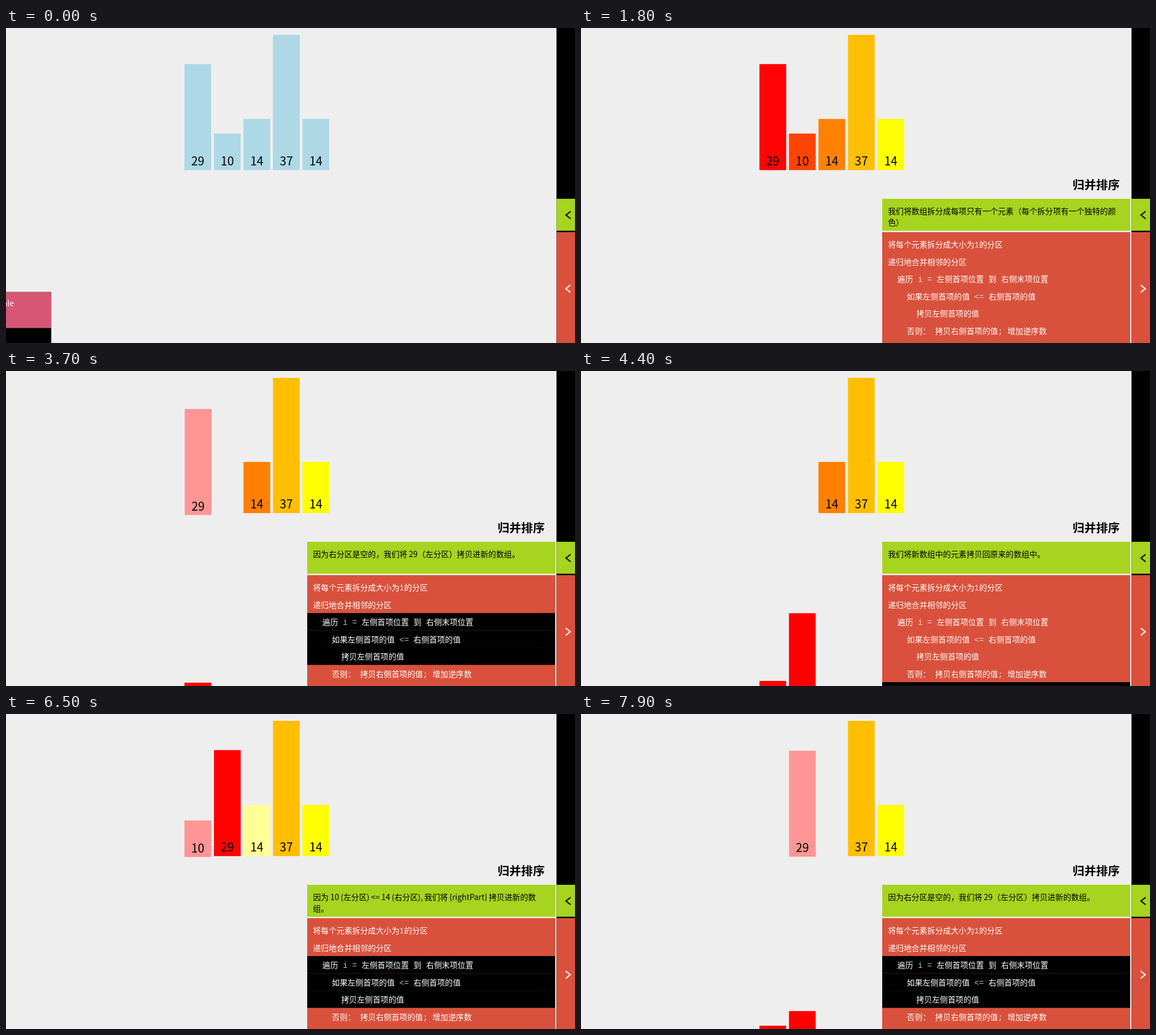
An HTML page that plays this animation: 1005 by 557 pixels, repeating every 8000 ms.

```html
<!DOCTYPE html>
<html lang="zh-CN">
<head>
<meta charset="utf-8">
<title>归并排序</title>
<style>
  html, body { margin: 0; width: 100%; height: 100%; overflow: hidden; background: #eee; }
  svg { display: block; overflow: hidden; }
  text { font: 13.89px "Noto Sans CJK SC", "Noto Sans CJK", sans-serif; white-space: pre; }
  #bars text { font-size: 20.84px; text-anchor: middle; }
  #title { font-size: 20.84px; font-weight: bold; text-anchor: end; }
  #status text { word-spacing: -.3px; }
  #code text { font-family: "Liberation Mono", "Noto Sans CJK SC", "Noto Sans CJK", monospace; fill: #fff; }
  #code tspan { fill-opacity: .75; }
  polyline { fill: none; stroke-width: 2.4; }
</style>
</head>
<body>
<svg id="stage" width="1005" height="557" viewBox="0 0 1005 557">
  <rect width="1005" height="557" fill="#eee"/>
  <g id="bars"></g>
  <svg id="menu" x="0" y="466.5" width="80" height="91">
    <rect width="80" height="91"/>
    <rect width="80" height="64" fill="#d65775"/>
    <text x="14" y="25" text-anchor="end" fill="#fff">ale</text>
  </svg>
  <text id="title" x="951.5" y="284.8">归并排序</text>
  <svg id="status" y="302" height="56.5">
    <rect width="438" height="57" fill="#a7d41e"/>
    <text x="10.2" y="26.6"></text>
    <text x="10.2"></text>
  </svg>
  <svg id="code" y="361" height="196">
    <rect width="438" height="196" fill="#d9513c"/>
  </svg>
  <rect x="972.3" width="33" height="557"/>
  <rect x="972.3" y="302" width="33" height="56.5" fill="#a7d41e"/>
  <rect x="972.3" y="361" width="33" height="196" fill="#d9513c"/>
  <polyline points="997.2,324.2 989,330.7 997.2,337.2" stroke="#1c2208"/>
  <polyline id="arrow" points="996.8,454.5 988.8,461 996.8,467.5" stroke="#f8dfdb"/>
</svg>
<script>
const LOOP = 8000, TICK = 100, MOVE = 280, SLIDE = 500, SLIDE_START = 165;
const BASE = 251.3, UNIT = 6.465, GAP = 52.12, LEFT = 315.2, DROP = 364.5;
const RED = '#ff0000', PINK = '#ff9696', BLUE = '#add8e6';

const leftEmpty = n => `因为右分区是空的，我们将 ${n}（左分区）拷贝进新的数组。`;
const takeRight = (a, b) => `因为 ${a} (左分区) > ${b} (右分区), 我们将 ${b} 拷贝进新的数组。`;
const addCount = n => `(我们将左分区的大小 (= 1) 加至逆序数 (${n}).)`;
const copyBack = '我们将新数组中的元素拷贝回原来的数组中。';

// start time, highlighted code lines, status lines, offset of the second status line
const steps = [
  { at: 1565, lit: [], say: ['我们将数组拆分成每项只有一个元素（每个拆分项有一个独特的颜', '色）'] },
  { at: 2265, lit: [1], say: ['我们将分区 [29] (索引 0 到 0) 和 [10] (索引 1 到 1) 合并。'] },
  { at: 2963, lit: [2, 5], say: [takeRight(29, 10), addCount(1)], skip: 38 },
  { at: 3663, lit: [2, 3, 4], say: [leftEmpty(29)] },
  { at: 4364, lit: [6], say: [copyBack] },
  { at: 5064, lit: [6], say: [copyBack] },
  { at: 5771, lit: [1], say: ['我们将分区 [10,29] (索引 0 到 1) 和 [14] (索引 2 到 2) 合并。'] },
  { at: 6471, lit: [2, 3, 4], say: ['因为 10 (左分区) <= 14 (右分区), 我们将 {rightPart} 拷贝进新的数', '组。'] },
  { at: 7173, lit: [2, 5], say: [takeRight(29, 14), addCount(2)], skip: 38 },
  { at: 7875, lit: [2, 3, 4], say: [leftEmpty(29)] }
];

// each move: step, slot, row (0 top, 1 bottom), colour
const bars = [
  { value: 29, moves: [[0, 0, 0, RED], [1, 0, 0, PINK], [3, 1, 1, RED], [5, 1, 0, RED], [7, 1, 0, PINK], [9, 2, 1, RED]] },
  { value: 10, moves: [[0, 1, 0, '#ff4000'], [1, 1, 0, '#ffd596'], [2, 0, 1, RED], [4, 0, 0, RED], [6, 0, 0, PINK], [7, 0, 1, RED]] },
  { value: 14, moves: [[0, 2, 0, '#ff8000'], [6, 2, 0, '#ffff96'], [8, 1, 1, RED]] },
  { value: 37, moves: [[0, 3, 0, '#ffbf00']] },
  { value: 14, moves: [[0, 4, 0, '#ffff00']] }
];

const lines = [
  [0, '将每个元素拆分成大小为<tspan>1</tspan>的分区'],
  [0, '递归地合并相邻的分区'],
  [1, '遍历<tspan> i = </tspan>左侧首项位置 到 右侧末项位置'],
  [2, '如果左侧首项的值<tspan> &lt;= </tspan>右侧首项的值'],
  [3, '拷贝左侧首项的值'],
  [2, '否则： 拷贝右侧首项的值<tspan>; </tspan>增加逆序数'],
  [0, '将元素拷贝回原来的数组中']
];

const $ = id => document.getElementById(id);
const add = (parent, tag, attrs) => {
  const el = document.createElementNS('http://www.w3.org/2000/svg', tag);
  set(el, attrs);
  return parent.appendChild(el);
};
function set(el, attrs) {
  for (const k in attrs) el.setAttribute(k, attrs[k]);
}
const clamp = p => Math.min(1, Math.max(0, p));
const swing = p => .5 - Math.cos(Math.PI * p) / 2;
const cubic = p => p < .5 ? 4 * p ** 3 : 1 - 4 * (1 - p) ** 3;
const mix = (a, b, p) => a + (b - a) * p;
const rgb = hex => [1, 3, 5].map(i => parseInt(hex.slice(i, i + 2), 16));

for (const [i, bar] of bars.entries()) {
  const h = bar.value * UNIT;
  bar.home = [i, 0, ...rgb(BLUE)];
  bar.moves = bar.moves.map(([step, slot, row, hex]) => ({ at: steps[step].at, to: [slot, row, ...rgb(hex)] }));
  bar.el = add($('bars'), 'g', {});
  bar.rect = add(bar.el, 'rect', { y: BASE - h, width: 47.2, height: h });
  add(bar.el, 'text', { x: 23.6, y: 243.2 }).textContent = bar.value;
}

const marks = lines.map(([depth, html], i) => {
  const top = 5.9 + 30.55 * i;
  const mark = add($('code'), 'rect', { y: top, width: 438, height: 30.55 });
  add($('code'), 'text', { x: 10.2 + depth * 16.67, y: top + 21.2 }).innerHTML = html;
  return mark;
});
const [first, second] = $('status').querySelectorAll('text');

function drawBar(bar, t) {
  let now = bar.home;
  for (const { at, to } of bar.moves) {
    const p = cubic(clamp((t - at) / MOVE));
    now = now.map((v, i) => mix(v, to[i], p));
  }
  const [slot, row, ...color] = now;
  set(bar.el, { transform: `translate(${LEFT + GAP * slot} ${DROP * row})` });
  set(bar.rect, { fill: `rgb(${color.map(Math.round)})` });
}

function draw(t) {
  const open = swing(clamp((t - SLIDE_START) / SLIDE));
  const width = 438 * open;
  for (const id of ['status', 'code']) set($(id), { x: 970 - width, width });
  set($('menu'), { width: Math.max(0, 80 - 190 * open) });
  set($('arrow'), { transform: `rotate(${180 * open} 992.7 461)` });
  $('title').style.visibility = open > 0 ? 'visible' : 'hidden';

  const step = steps.filter(s => s.at <= t).pop() || { lit: [], say: [] };
  first.textContent = step.say[0] || '';
  second.textContent = step.say[1] || '';
  set(second, { y: 26.6 + (step.skip || 20) });
  marks.forEach((m, i) => set(m, { visibility: step.lit.includes(i) ? 'visible' : 'hidden' }));
  bars.forEach(bar => drawBar(bar, t));
}

const begin = performance.now();
function frame() {
  const t = (performance.now() - begin) % LOOP;
  draw(Math.floor(t / TICK) * TICK);
  requestAnimationFrame(frame);
}
frame();
</script>
</body>
</html>
```
